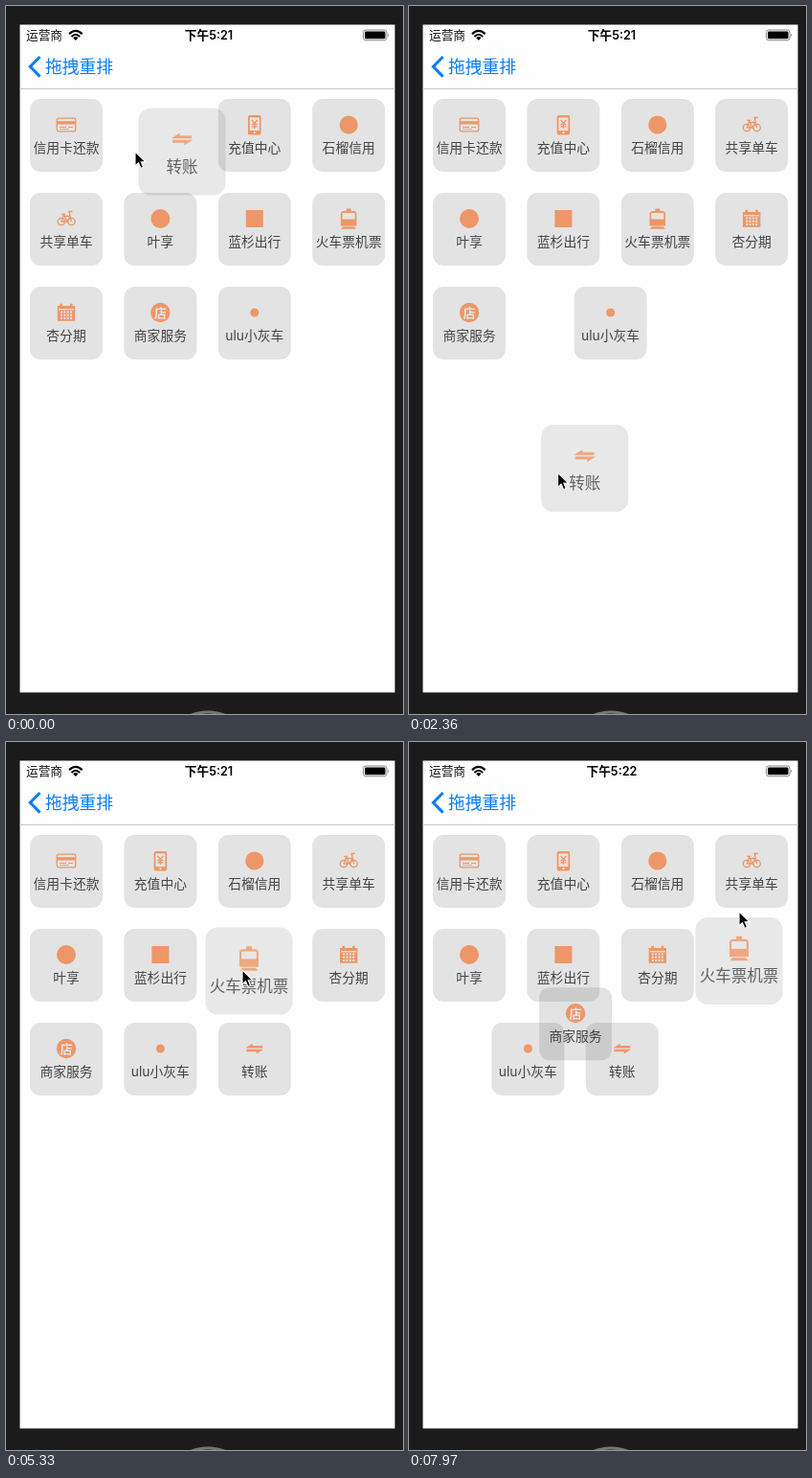
An HTML page for the animation above (8000 ms loop, 415 by 739 pixels).

```html
<!DOCTYPE html>
<html lang="zh-CN">
<head>
<meta charset="utf-8">
<title>拖拽重排</title>
<style>
  html, body { margin: 0; width: 100%; height: 100%; overflow: hidden; background: #1b1b1b; }
  svg { display: block; width: 100%; height: 100%; }
  text { font-family: Inter, "Noto Sans CJK SC", "Noto Sans CJK", sans-serif; }
  .label { font-size: 13.8px; fill: #444; text-anchor: middle; }
  .tile > rect { fill: #000; fill-opacity: .106; }
  .icon { fill: #ed9768; stroke: none; }
  .icon .line { fill: none; stroke: #ed9768; stroke-width: 1.3; }
  .icon .gap { fill: #e4e4e4; }
  .icon .cut { fill: none; stroke: #e4e4e4; stroke-width: 1.3; }
</style>
</head>
<body>
<svg viewBox="0 0 415 739">
  <rect width="415" height="739" fill="#1b1b1b"/>
  <rect x="14.5" y="19.5" width="392" height="697" fill="#fefefe"/>
  <path d="M14.5 86.5H406.5" stroke="#c6c6c6"/>
  <circle cx="211" cy="784" r="47" fill="none" stroke="#747474" stroke-width="3"/>

  <text x="21" y="35" font-size="12.7" fill="#111">运营商</text>
  <g fill="none" stroke="#000" stroke-width="2.1">
    <path d="M66 29.2Q72.8 22.4 79.6 29.2M68.5 32Q72.8 27.6 77.1 32"/>
    <path d="M70.2 33.2Q72.8 31 75.4 33.2L72.8 36Z" fill="#000" stroke="none"/>
  </g>
  <text id="clock" x="212" y="35" font-size="12.7" font-weight="600" text-anchor="middle"></text>
  <rect x="373.5" y="25" width="24.5" height="10.8" rx="2.6" fill="none" stroke="#888"/>
  <rect x="375" y="26.5" width="21.5" height="7.8" rx="1.3"/>
  <path d="M399.3 28.6Q401.4 30.4 399.3 32.2Z" fill="#888"/>

  <path d="M35.5 53L25.3 63.3L35.5 73.6" fill="none" stroke="#087dfb" stroke-width="3"/>
  <text x="41" y="69.8" font-size="17.8" fill="#087dfb">拖拽重排</text>

  <g id="board"></g>
  <path id="cursor" d="M0 0V15L3.5 11.7L6 17.4L8.6 16.3L6.2 10.8H11Z" stroke="#fff" stroke-width="1.1"/>
</svg>
<script>
const LOOP = 8000, STEP = 147.7;
// Durations below are counted in steps.
const LAG = 1, LIFT = 2, REACTION = .63, SLIDE = 2.26;
const REACH = 44;

const dot = r => `<circle r="${r}"/>`;
const grid = [-5, -1.7, 1.7, 5].map(x => [-.5, 2.7, 5.9].map(y =>
  `<rect class="gap" x="${x - 1}" y="${y - 1}" width="2" height="2"/>`).join('')).join('');

const icons = {
  card: `<rect class="line" x="-9.8" y="-6.8" width="19.6" height="13.6" rx="1.8"/>
    <path d="M-9.5-3.8h19v3.2h-19zM-7 2h7v1h-7zM2 2h5v1h-5zM-7 4h10v.8h-10z"/>`,
  transfer: '<path d="M-9.5-.5L-2-5.3V-3H8.3V-.5ZM9.5 .8L2 5.6V3.3H-8.3V.8Z"/>',
  phone: `<rect x="-6.8" y="-10" width="13.6" height="20.5" rx="2"/>
    <rect class="gap" x="-5" y="-7.6" width="10" height="13.6"/><circle class="gap" cy="8.2" r="1.1"/>
    <path class="line" d="M-3-5.2L0-1.5L3-5.2M0-1.5V4M-3-.5H3M-3 1.8H3"/>`,
  bike: `<g class="line"><circle cx="-5.2" cy="3" r="3.7"/><circle cx="5.4" cy="3" r="3.7"/>
    <path d="M-5.2 3L-2.5-3.5L1 3H-5.2M-2.5-2.5H4M1 3L4-2.5M5.4 3L3-7.5H6.5M-5-4.5H-1"/></g>`,
  train: `<path d="M-8.3-5.5Q-8-8-5-8H-2.5V-10.5H2.5V-8H5Q8-8 8.3-5.5V7.5H-8.3Z"/>
    <path class="gap" d="M-6.5-6H6.5V.5H-6.5Z"/>
    <path d="M-6 8.3H6L8 10.8H-8Z"/>`,
  calendar: `<path d="M-9.2-7H-6.5V-9.2H-4V-7H4V-9.2H6.5V-7H9.2V8.8H-9.2Z"/>
    <path class="cut" d="M-8-3.3H8"/>${grid}`,
  shop: dot(10.2) + '<text class="gap" y="4.7" font-size="13" font-weight="600" text-anchor="middle">店</text>',
  square: '<rect x="-9" y="-9" width="18" height="18"/>'
};

const items = [
  ['信用卡还款', icons.card], ['转账', icons.transfer], ['充值中心', icons.phone], ['石榴信用', dot(9.6)],
  ['共享单车', icons.bike], ['叶享', dot(10)], ['蓝杉出行', icons.square], ['火车票机票', icons.train],
  ['杏分期', icons.calendar], ['商家服务', icons.shop], ['ulu小灰车', dot(4.5)]
];

// Turning points of the pointer: step, x, y
const pointerPath = [
  [-1, 184, 152], [0, 135, 152], [1, 116, 154], [3, 116, 154], [5, 127, 282], [6, 124, 350], [8.5, 124, 350],
  [10, 216, 453], [11, 259, 465], [12, 268, 468], [17.8, 105, 496], [20, 116, 498], [21, 218, 498],
  [27, 262, 266], [29, 254, 239], [35, 254, 239], [36, 247, 238], [38, 155, 237], [41, 255, 236],
  [43, 263, 236], [44, 335, 225], [46, 361, 240], [48, 355, 445], [50.8, 350, 475], [52, 345, 280], [54, 345, 177]
];

const drags = [
  { item: 1, from: -LIFT, to: 27 },
  { item: 7, from: 33, to: 57 }
];

const lerp = (a, b, p) => a + (b - a) * p;
const clamp = p => Math.max(0, Math.min(1, p));
const ease = p => (1 - Math.cos(Math.PI * clamp(p))) / 2;
const slot = i => [63 + 98.4 * (i % 4), 135 + 98 * Math.floor(i / 4)];

function pointer(step) {
  const i = Math.max(1, pointerPath.findIndex(point => point[0] >= step));
  const [t0, x0, y0] = pointerPath[i - 1], [t1, x1, y1] = pointerPath[i];
  const p = clamp((step - t0) / (t1 - t0));
  return [lerp(x0, x1, p), lerp(y0, y1, p)];
}

// Slot under a point; -1 in the gaps. Everything below the grid counts as its last row.
function slotAt([x, y]) {
  const column = Math.round((x - 63) / 98.4);
  const row = Math.min(2, Math.round((y - 135) / 98));
  const [cx, cy] = slot(row * 4 + column);
  if (Math.abs(x - cx) > REACH || Math.abs(Math.min(y, 331) - cy) > REACH) return -1;
  return Math.min(row * 4 + column, items.length - 1);
}

// Each time a dragged tile enters another slot, the rest slide to a new order.
function findReorders() {
  const order = items.map((_, i) => i), found = [];
  for (const { item, from, to } of drags) {
    for (let step = from + LIFT; step < to - LIFT; step += .02) {
      const here = order.indexOf(item), target = slotAt(pointer(step));
      if (target < 0 || target === here) continue;
      order.splice(target, 0, ...order.splice(here, 1));
      found.push({ start: step + REACTION, order: [...order] });
    }
  }
  return found;
}
const reorders = findReorders();

function layout(step) {
  const places = items.map((_, i) => slot(i));
  for (const { start, order } of reorders) {
    const p = ease((step - start) / SLIDE);
    order.forEach((item, i) => {
      const goal = slot(i);
      places[item] = places[item].map((v, axis) => lerp(v, goal[axis], p));
    });
  }
  return places;
}

const board = document.getElementById('board');
const clock = document.getElementById('clock');
const cursor = document.getElementById('cursor');
board.innerHTML = items.map(([name, icon]) => `<g class="tile">
  <rect x="-38" y="-38" width="76" height="76" rx="11"/>
  <g class="icon" transform="translate(0 -11)">${icon}</g>
  <text class="label" y="18.2">${name}</text></g>`).join('');
const tiles = [...board.children];

function place(tile, [x, y], lift) {
  tile.setAttribute('transform', `translate(${x} ${y}) scale(${1 + .2 * lift})`);
  tile.setAttribute('opacity', 1 - .17 * lift);
}

function draw(step) {
  const places = layout(step);
  places.forEach((spot, i) => place(tiles[i], spot, 0));
  for (const { item, from, to } of drags) {
    const lift = clamp(Math.min(step - from, to - step) / LIFT);
    if (!lift) continue;
    const held = pointer(step - LAG);
    place(tiles[item], places[item].map((v, axis) => lerp(v, held[axis], lift)), lift);
    board.append(tiles[item]);
  }
  cursor.setAttribute('transform', `translate(${pointer(step).join(' ')})`);
  clock.textContent = step < 46 ? '下午5:21' : '下午5:22';
}

// The picture advances in coarse steps.
let shown = -1;
function tick() {
  const step = Math.floor((performance.now() % LOOP + 14) / STEP);
  if (step !== shown) draw(shown = step);
  requestAnimationFrame(tick);
}
tick();
</script>
</body>
</html>
```
